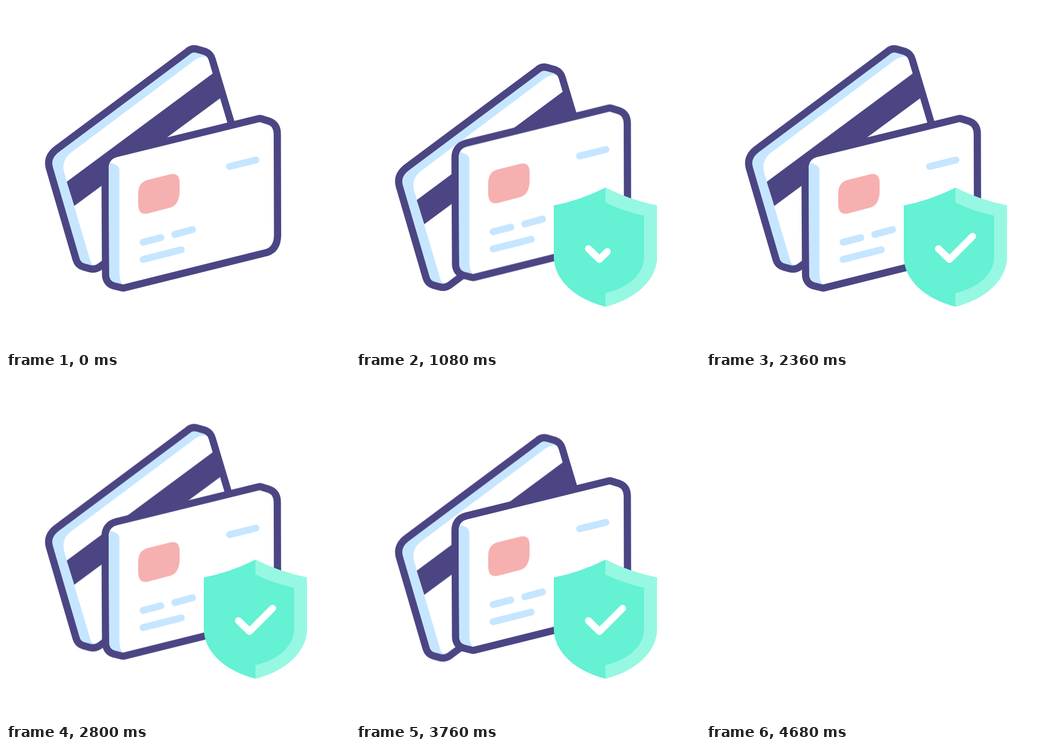
Animation, 640 px wide and 640 px high, one loop 4.72 s. Source, as an HTML page:

```html
<!DOCTYPE html>
<html lang="en">
<head>
<meta charset="utf-8">
<title>Secure card payment</title>
<style>
  html, body { margin: 0; width: 100%; height: 100%; overflow: hidden; background: #fff; }
  svg { display: block; width: 100vw; height: 100vh; }

  :root { --loop: 4720ms; }
  .scene { animation: scene var(--loop) step-end infinite; }
  .card { animation: slide var(--loop) cubic-bezier(.73, 0, .33, 1) infinite; }
  .back { --shift: 34px; }
  .front { --shift: -19.5px; }
  .shield {
    transform-origin: 464px 448px;
    animation: pop var(--loop) linear infinite;
  }
  .check {
    stroke-dasharray: 1 2;
    animation: draw var(--loop) linear infinite;
  }

  .navy { fill: #4b4683; }
  .side { fill: #c6e6ff; }
  .face { fill: #fff; }
  .chip { fill: #f7b0b0; }
  .mint { fill: #64f1d4; }
  .light { fill: #96f8e2; }
  .edge { fill: #4b4683; stroke: #4b4683; stroke-width: 27; stroke-linejoin: round; }
  .lines { fill: none; stroke: #c6e6ff; stroke-width: 13; stroke-linecap: round; }
  .check { fill: none; stroke: #fff; stroke-width: 13; stroke-linecap: round; stroke-linejoin: round; }

  /* Each slide takes 1000 ms and rests for 160 ms. */
  @keyframes slide {
    0%, 45.763%, 49.153%, 94.915%, 100% { transform: translateY(0); }
    21.186%, 24.576%, 70.339%, 73.729% { transform: translateY(var(--shift)); }
  }
  @keyframes pop {
    0%, 10.6% { transform: scale(0); animation-timing-function: cubic-bezier(.3, 0, .25, 1); }
    21.186%, 90% { transform: scale(1); animation-timing-function: cubic-bezier(.7, 0, .6, 1); }
    98.8%, 100% { transform: scale(0); }
  }
  @keyframes draw {
    0%, 19.492% { stroke-dashoffset: 1.1; animation-timing-function: cubic-bezier(.4, 0, .6, 1); }
    25.636%, 100% { stroke-dashoffset: 0; }
  }
  @keyframes scene {
    0% { visibility: visible; }
    98.8%, 100% { visibility: hidden; }
  }
</style>
</head>
<body>
<svg viewBox="0 0 640 640">
  <defs>
    <path id="backShape" d="M87 299C84 287 89 279 98 272L342 90Q347 85 354 87L368 91Q375 94 377 101L432 285L170 480Q164 484 157 482L146 479Q139 477 137 470Z"/>
    <path id="frontShape" d="M191 302Q191 285 207 281L472 216L488 221Q498 225 498 238L498.5 427Q498 447 484 452L218 518L202 514Q192 511 192 499Z"/>
  </defs>
  <g class="scene">
    <g class="card back">
      <use href="#backShape" class="edge"/>
      <use href="#backShape" class="side"/>
      <path class="face" d="M108 309C104 292 111 280 122 272L352 100Q362 93 373 94Q376 97 377 101L432 285L170 480L165 482Q159 481 157 474Z"/>
      <path class="navy" d="M113 327L388 123L402 169L127 372Z"/>
    </g>
    <g class="card front">
      <use href="#frontShape" class="edge"/>
      <use href="#frontShape" class="face"/>
      <path class="side" d="M191 302Q191 296 194 291L204 295Q211 298 211 307L211 500Q212 514 218 518L202 514Q192 511 192 499Z"/>
      <path class="chip" d="M246 349Q246 329 262 324L306 313Q323 310 323 329L323 346Q322 370 306 375L264 386Q246 390 246 368Z"/>
      <path class="lines" d="M416 298.5L465 286.5M255 439.5L288 431M314 425L347 416M255 471.5L326 453.5"/>
    </g>
    <g class="shield">
      <path class="mint" d="M464 338Q512 362 560 371V466C560 510 520 545 464 559.5C408 545 368 510 368 466V371Q416 362 464 338Z"/>
      <path class="light" d="M464 338Q512 362 560 371V466C560 510 520 545 464 559.5Z"/>
      <path class="mint" d="M463 365Q500 383 536 390V466C536 500 505 525 463 534.5Z"/>
      <path class="check" pathLength="1" d="M432.5 451.5L453 471.5L496 428.5"/>
    </g>
  </g>
</svg>
</body>
</html>
```
